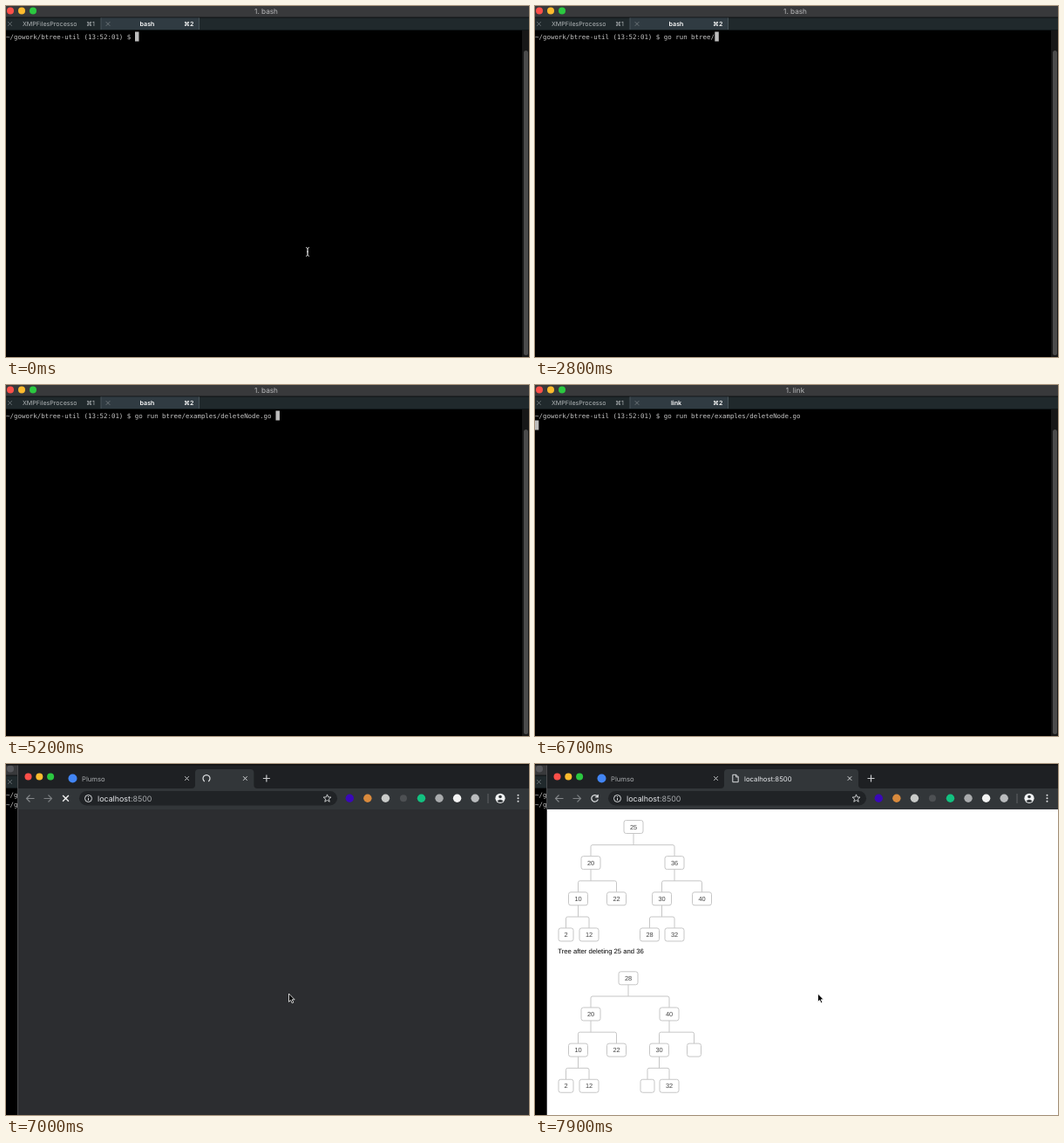
Write an HTML page that moves like this. It is 600 px wide and 402 px high and loops after 8000 ms.

```html
<!DOCTYPE html>
<html lang="en">
<head>
<meta charset="utf-8">
<title>Terminal and browser</title>
<style>
html, body { margin: 0; width: 100%; height: 100%; overflow: hidden; background: #000; }
svg { display: block; width: 600px; height: 402px; text-rendering: geometricPrecision; }
text { white-space: pre; }
.ui { font-family: Inter, Roboto, sans-serif; }
.mono { font-family: "DejaVu Sans Mono", monospace; font-size: 7.45px; }
.page { font-family: "Liberation Sans", Arial, sans-serif; }
</style>
</head>
<body>
<svg id="stage" viewBox="0 0 600 402"></svg>
<script>
const stage = document.getElementById('stage');
const LOOP = 8000, STEP = 100, CHAR = 4.485;
const PROMPT = '~/gowork/btree-util (13:52:01) $ ';
const COMMAND = 'go run btree/examples/deleteNode.go ';
// [time, characters typed]; jumps are tab completions
const TYPED = [[0, 0], [800, 1], [1000, 2], [1200, 3], [1400, 4], [1500, 5], [1800, 6],
  [1900, 7], [2100, 8], [2400, 9], [2600, 10], [2800, 13], [3600, 14], [3900, 15],
  [4100, 22], [4800, 23], [5000, 24], [5200, 36]];

// Trees: [x, label, left, right]
const BEFORE = [113, '25',
  [64, '20', [49.5, '10', [35.5, '2'], [62, '12']], [93.5, '22']],
  [160, '36', [145.5, '30', [131.5, '28'], [160, '32']], [191.5, '40']]];
const AFTER = [107, '28',
  [64, '20', [49.5, '10', [35.5, '2'], [62, '12']], [93.5, '22']],
  [154, '40', [142.5, '30', [129, ''], [154, '32']], [182.5, '']]];

const rect = (x, y, w, h, fill, more = '') =>
  `<rect x="${x}" y="${y}" width="${w}" height="${h}" fill="${fill}" ${more}/>`;
const disc = (x, y, r, fill, more = '') =>
  `<circle cx="${x}" cy="${y}" r="${r}" fill="${fill}" ${more}/>`;
const line = (d, color, width = 1, more = '') =>
  `<path d="${d}" fill="none" stroke="${color}" stroke-width="${width}" ${more}/>`;
const text = (x, y, size, fill, str, font = 'ui', more = '') =>
  `<text x="${x}" y="${y}" font-size="${size}" fill="${fill}" class="${font}" ${more}>${str}</text>`;
const cross = (x, y, r, color, width = 1) =>
  line(`M${x - r} ${y - r}l${2 * r} ${2 * r}m0 ${-2 * r}l${-2 * r} ${2 * r}`, color, width);
const at = (x, y, art) => `<g transform="translate(${x} ${y})">${art}</g>`;
const lights = (x, y, dx, r) => ['#fc4f49', '#fdbb2e', '#2bc840']
  .map((c, i) => disc(x + i * dx, y, r, c)).join('');

function terminal(t) {
  const job = t >= 6700 ? 'link' : 'bash';
  const count = TYPED.filter(k => k[0] <= t).pop()[1];
  const entered = t >= 6100;
  const mono = (y, str) => text(0, y, 7.45, '#c4c4c4', str, 'mono');
  const middle = 'text-anchor="middle"';
  return rect(0, 0, 600, 402, '#000')
    + rect(0, 0, 600, 13, '#38393b') + rect(0, 12.5, 600, 1, '#15191b')
    + (t < 7000 ? lights(5, 5.5, 13, 4) : disc(5, 5.5, 4, '#55565a'))
    + text(298.5, 9, 8.2, '#b9babb', '1. ' + job, 'ui', middle)
    + rect(0, 13.5, 600, 14, '#20292c') + rect(109, 13.5, 112, 14, '#303b42')
    + rect(108.5, 13.5, 1, 14, '#48545a') + rect(221, 13.5, 1, 14, '#48545a')
    + rect(0, 27, 600, 1, '#11181a')
    + cross(4.5, 20.5, 2.3, '#858b8e', .7) + cross(117, 20.5, 2.3, '#858b8e', .7)
    + text(19, 23.2, 7.1, '#b2b7b9', 'XMPFilesProcesso') + text(92, 23.2, 7.1, '#b2b7b9', '⌘1')
    + text(162, 23.2, 7.1, '#fff', job, 'ui', middle + ' font-weight="600"')
    + text(204, 23.2, 7.1, '#fff', '⌘2', 'ui', 'font-weight="600"')
    + rect(592, 28, 8, 374, '#171717') + rect(594, 51, 5, 349, '#4b4b4b', 'rx="2.5"')
    + mono(38, PROMPT + COMMAND.slice(0, count))
    + (t >= 6900 ? mono(49.3, PROMPT)
      : entered ? rect(0, 40.5, 4.3, 11, '#bcbcbc')
      : rect((PROMPT.length + count) * CHAR, 29.5, CHAR, 11, '#bcbcbc'));
}

function ibeam(t) {
  if (t >= 800) return '';
  const [x, y] = t < 100 ? [346, 281.5] : t < 200 ? [328, 268] : [323.5, 263.5];
  return at(x, y, line('M-2-5q2 0 2 2v6q0 2-2 2m4-10q-2 0-2 2v6q0 2 2 2M-1 0h2', '#d5d5d5', .9));
}

const star = () => line(Array.from({ length: 10 }, (_, i) => {
  const a = i * Math.PI / 5, r = i % 2 ? 2 : 4.6;
  return (i ? 'L' : 'M') + r * Math.sin(a) + ' ' + -r * Math.cos(a);
}).join('') + 'Z', '#d5d7d9', .9);

const reload = () => line('M3.2-2.2A3.8 3.8 0 1 0 3.8 1M3.7-4.4v3h-3', '#e3e5e7', 1.2);
const arrow = (x, dir, color) =>
  at(x, 39.5, line(`M${-4.5 * dir} 0h${9 * dir}m${-4 * dir}-4l${4 * dir} 4l${-4 * dir} 4`, color, 1.1));

const tab = (x, w) =>
  `<path d="M${x - 4} 28q4 0 4-4V10q0-4 4-4h${w - 8}q4 0 4 4v14q0 4 4 4z" fill="#323639"/>`;

function browser(t) {
  const opened = t >= 7000, loading = opened && t < 7800;
  const p = Math.min(1, Math.max(0, (t - 6900) / 400));
  const w = 154 * (1 - (1 - p) ** 2), end = 217 + (opened ? w : 0);
  const grey = '#a7aaad';
  let s = rect(13.5, 1, 587, 402, '#1e2023') + rect(13, 1, 1, 401, '#4b4c4e') + rect(0, 0, 600, 1.5, '#111');
  if (opened) s += lights(25.5, 14.5, 12.8, 4);
  s += opened ? tab(217, w) : tab(63, 154);
  s += rect(14, 28, 586, 24, '#323639') + rect(84, 31, 296, 16.5, '#202326', 'rx="8.25"');
  s += disc(76.5, 16.5, 5, '#4285f4') + text(87, 19.5, 7.7, opened ? grey : '#dcdee0', 'Plumso')
    + cross(207.5, 16.5, 2.3, '#c5c7c9');
  if (opened) {
    if (loading) s += at(230, 16.5, line('M-2.2-3.4A4 4 0 1 0 2.2-3.4', '#e0e2e4', 1.2,
      `transform="rotate(${(t - 7400) * .45})"`));
    else s += at(230, 16.5, line('M-3.2-4.2h4l2.4 2.4v6h-6.4zM.6-4.2v2.6h2.6', '#d8dadc', 1));
    if (w > 110) s += text(240, 19.5, 7.75, '#e8eaed', 'localhost:8500');
    if (w > 40) s += cross(end - 10, 16.5, 2.3, '#d5d7d9');
  }
  s += at(end + 14.5, 16.5, line('M-4 0h8M0-4v8', '#c9cbcd', 1.2));
  s += arrow(28, -1, opened ? '#85888b' : '#7c7f82') + arrow(48, 1, '#7c7f82');
  s += loading ? cross(68.5, 39.3, 3.4, '#f0f0f0', 1.4) : at(68.5, 39.3, reload());
  s += opened
    ? disc(94.5, 39.5, 4, 'none', 'stroke="#d9dbdd"') + line('M94.5 39v2.7M94.5 37v1', '#d9dbdd')
      + text(105, 42.6, 8.9, '#e8eaed', `localhost<tspan fill="${grey}">:8500</tspan>`)
    : rect(92, 38.5, 5.4, 4.5, '#d5d7d9', 'rx=".6"') + line('M93.2 38.5v-1.2a1.5 1.5 0 0 1 3 0v1.2', '#d5d7d9', .9)
      + text(105, 42.6, 8.8, '#e8eaed', 'https://www.plumso.com');
  if (!opened) s += disc(348, 39.3, 3.3, 'none', 'stroke="#d5d7d9"') + disc(348, 39.3, 1.4, '#d5d7d9')
    + line('M348 34.5v1.5M348 42.6v1.5M343.2 39.3h1.5M351.3 39.3h1.5', '#d5d7d9');
  s += at(368.5, 39.5, star());
  [opened ? '#3a08b8' : '#4285f4', '#d98a3d', '#c9cbc9', '#4d5053', '#13c180', '#a9abad', '#f4f4f4', '#b9bbbd']
    .forEach((c, i) => s += disc(394.3 + i * 20.55, 39.3, i === 3 ? 4 : 4.7, c));
  s += rect(552.5, 34, 1, 11, '#606366') + disc(567, 39.3, 5.6, '#f1f3f4')
    + disc(567, 37.5, 1.8, '#323639') + '<path d="M563.4 42.6q3.6-3.6 7.2 0q-3.6 3-7.2 0" fill="#323639"/>';
  for (let i = -1; i < 2; i++) s += disc(587.5, 39.3 + i * 3.5, 1, '#e0e2e4');
  return s;
}

function searchPage() {
  const label = (x, y, str, color = '#333') => text(x, y, 8.3, color, str, 'page');
  let s = rect(14, 52, 586, 350, '#fff')
    + label(29.5, 74, 'About') + label(63, 74, 'Store')
    + label(481.5, 74, 'Quemo', '#222') + label(513, 74, 'Images', '#222');
  for (let i = 0; i < 9; i++) s += rect(555 + i % 3 * 4, 66.3 + Math.floor(i / 3) * 4, 2.6, 2.6, '#666');
  s += rect(579.5, 62, 40, 19, '#3c78d8', 'rx="1.5"') + text(587, 74.5, 8.3, '#fff', 'Sign in', 'page', 'font-weight="700"');
  s += disc(327.5, 208, 29, '#3b74d7');
  s += rect(177, 255.5, 310.5, 28.5, '#fff', 'rx="14.25" stroke="#dcdfe3"');
  s += rect(466.8, 263.5, 4, 8, '#4285f4', 'rx="2"')
    + line('M464.6 269.2a4.2 4.2 0 0 0 8.4 0M468.8 273.4v2.8', '#dd6b3a', 1.3);
  s += rect(242.5, 304, 82, 23, '#f0f0f0', 'rx="2"') + rect(332, 304, 91.5, 23, '#f0f0f0', 'rx="2"')
    + text(283.5, 318.7, 8.85, '#555', 'Plumso Search', 'page', 'text-anchor="middle"')
    + text(377.7, 318.7, 8.85, '#555', "I'm Feeling Lucky", 'page', 'text-anchor="middle"');
  s += rect(14, 365, 579, 27, '#f1f1f1') + rect(14, 365, 579, 1, '#e2e2e2');
  [[32.5, 'Advertising'], [91.5, 'Business'], [508.5, 'Privacy'], [553.5, 'Terms']]
    .forEach(([x, str]) => s += label(x, 381.5, str, '#5c5c5c'));
  return s + rect(592.5, 52, 7.5, 350, '#f7f7f7') + rect(592.5, 52, .7, 340, '#e3e3e3')
    + rect(594.7, 53.5, 5, 326, '#bfbfbf', 'rx="2.5"')
    + rect(14, 392, 586, 10, '#f7f7f7') + rect(14, 392, 586, .7, '#e3e3e3')
    + rect(15.5, 394.2, 528, 5.5, '#bfbfbf', 'rx="2.7"');
}

function tree([x, name, left, right], y) {
  const w = name.length > 1 ? 22 : name ? 17 : 16, next = y + 41.15;
  let s = rect(x - w / 2, y - 7.5, w, 15, '#fff', 'rx="2.5" stroke="#c6c6c6"')
    + text(x, y + 2.6, 7.4, '#444', name, 'page', 'text-anchor="middle"');
  if (left) s += line(`M${x} ${y + 7.5}V${y + 20.7}M${left[0]} ${next - 7.5}V${y + 22.7}q0-2 2-2`
    + `H${right[0] - 2}q2 0 2 2V${next - 7.5}`, '#c6c6c6') + tree(left, next) + tree(right, next);
  return s;
}

const treePage = () => rect(14, 52, 586, 350, '#fff') + tree(BEFORE, 72)
  + text(26.3, 216.5, 7.7, '#000', 'Tree after deleting 25 and 36', 'page') + tree(AFTER, 245.3);

const pointer = () => at(324.5, 263, '<path d="M0 0v9.4l2.1-2 1.6 3.4 1.6-.7-1.6-3.3h2.9z" fill="#000" stroke="#fff" stroke-width=".8"/>');

function scene(t) {
  if (t < 6900) return terminal(t) + ibeam(t);
  const page = t < 7000 ? searchPage() : t < 7700 ? rect(14, 52, 586, 350, '#2c2d30') : treePage();
  return terminal(t) + browser(t) + page + pointer();
}

let shown = -1;
function tick(now) {
  const t = Math.floor(now % LOOP / STEP) * STEP;
  if (t !== shown) stage.innerHTML = scene(shown = t);
  requestAnimationFrame(tick);
}
tick(0);
</script>
</body>
</html>
```
